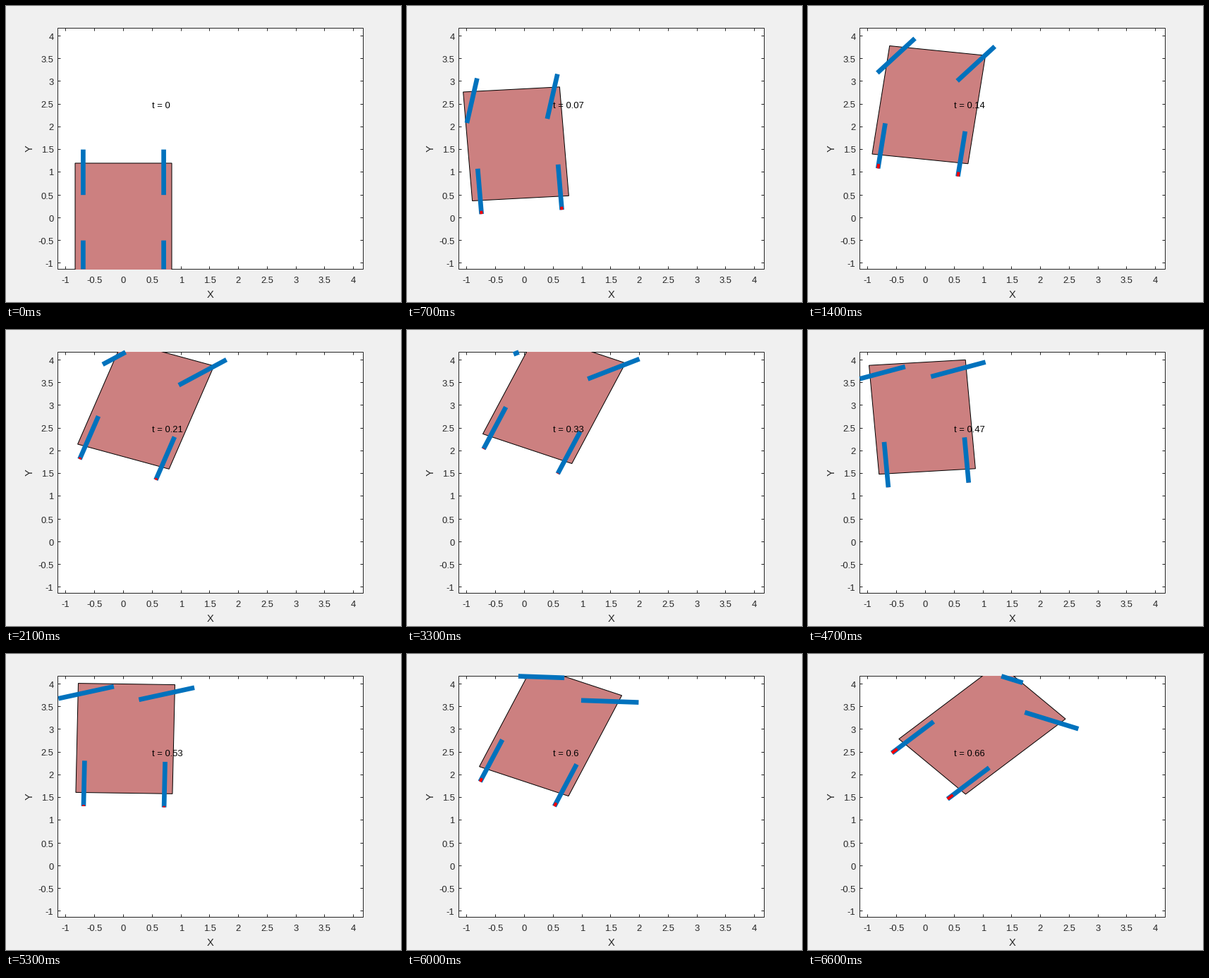
A matplotlib script for the animation above (6.7 s loop, 560 px wide and 420 px high).

```python
import numpy as np
import matplotlib.pyplot as plt
from matplotlib.animation import FuncAnimation
from matplotlib.collections import LineCollection
from matplotlib.patches import Polygon, Rectangle

FRAMES, STEP = 67, 100
SUB = 20                                 # integration steps per frame
PT = 0.72                                # points per pixel at 100 dpi
L, R, T, B = 73.5, 506.5, 31.5, 373.5    # plot box in pixels
INK, BLUE = "#262626", "#0072BD"

plt.rcParams["font.family"] = "Liberation Sans"


def drive():
    """Rear axle path, heading, speed and curvature of a bicycle-model car."""
    when = [0, 3, 7, 14, 21, 33, 36, 41, 44, 53, 66]
    pedal = [.2, .298, .143, .105, .062, -.032, -.055, -.0384, -.0227, .0243, .0668]
    wheel = [0, -.129, .125, .33, .375, .435, .585, .98, 2.05, 1.7, 1.07]
    t = np.arange(FRAMES * SUB) / SUB
    mid = t + 0.5 / SUB
    ds = np.interp(mid, when, pedal) / SUB
    turn = ds * np.interp(mid, when, wheel)
    angle = np.cumsum(turn) - turn
    dx, dy = ds * np.sin(angle + turn / 2), ds * np.cos(angle + turn / 2)
    x, y = np.cumsum(dx) - dx, np.cumsum(dy) - dy - 1
    n = np.arange(FRAMES)
    path = np.stack([x, y], -1)[::SUB]
    return path, angle[::SUB], np.interp(n, when, pedal), np.interp(n, when, wheel)


path, heading, speed, bend = drive()
steer = np.arctan(2 * bend)
slip = np.maximum(0, 27 * speed ** 2 * bend)


def to_px(p):
    p = np.asarray(p, float)
    return np.stack([166.5 + 81.55 * p[..., 0], 300.4 - 64.5 * p[..., 1]], -1)


def axis_of(a):
    return np.array([np.sin(a), np.cos(a)])


def clip(p, q):
    """Part of the segment p-q inside the plot box, or None."""
    d, lo, hi = q - p, 0.0, 1.0
    for i, (a, b) in enumerate([(L, R), (T, B)]):
        if abs(d[i]) < 1e-9:
            if not a <= p[i] <= b:
                return None
            continue
        u, v = sorted([(a - p[i]) / d[i], (b - p[i]) / d[i]])
        lo, hi = max(lo, u), min(hi, v)
    return [p + lo * d, p + hi * d] if lo < hi else None


def clipped(segments):
    parts = (clip(*to_px(s)) for s in segments)
    return [s for s in parts if s is not None]


fig = plt.figure(figsize=(5.6, 4.2), dpi=100, facecolor="#F0F0F0")
ax = fig.add_axes([0, 0, 1, 1])
ax.set_xlim(0, 560)
ax.set_ylim(420, 0)
ax.axis("off")


def label(x, y, s, size=13, **kw):
    kw = {"color": INK, "ha": "center", "va": "baseline", **kw}
    return ax.text(x, y, s, fontsize=size * PT, **kw)


def lines(segments, color, width, z):
    c = LineCollection(segments, colors=color, lw=width * PT,
                       capstyle="butt", zorder=z, snap=False)
    ax.add_collection(c, autolim=False)
    return c


# Plot box, ticks and labels
ax.add_patch(Rectangle((L, T), R - L, B - T, fc="white", ec=INK, lw=PT,
                       zorder=1, snap=False))
ticks = []
for v in np.arange(-1, 4.1, 0.5):
    x, y = np.floor(to_px((v, v))) + 0.5
    ticks += [[(x, B), (x, B - 4)], [(x, T), (x, T + 4)],
              [(L, y), (L + 4, y)], [(R, y), (R - 4, y)]]
    label(x, 393.4, f"{v:g}")
    label(67.5, y + 5, f"{v:g}", ha="right")
lines(ticks, INK, 1, 1)
label(290, 414, "X", 14.6)
label(37.7, 202.5, "Y", 14.6, rotation=90, rotation_mode="anchor")

# Moving parts
window = Rectangle((L - .5, T - .5), R - L + 1, B - T + 1, fc="none", ec="none")
ax.add_patch(window)
body = Polygon(np.zeros((4, 2)), fc="#CC8080", ec="black", lw=PT, zorder=2, snap=False)
ax.add_patch(body)
body.set_clip_path(window)
wheels = lines([], BLUE, 6.67, 3)
marks = lines([], "red", 4, 4)
clock = label(206.7, 145, "", color="black", ha="left", zorder=5)


def draw(n):
    rear, fwd = path[n], axis_of(heading[n])
    side = np.array([fwd[1], -fwd[0]])
    roll = axis_of(heading[n] + steer[n])

    mid = rear + fwd
    body.set_xy(to_px([mid + .84 * a * side + 1.2 * b * fwd
                       for a, b in [(-1, -1), (-1, 1), (1, 1), (1, -1)]]))
    tyres, tails = [], []
    for s in (-.7, .7):
        back, front = rear + s * side, rear + s * side + 2 * fwd
        tyres += [(back - fwd / 2, back + fwd / 2), (front - roll / 2, front + roll / 2)]
        tails.append((back - fwd / 2, back + (slip[n] - .5) * fwd))
    wheels.set_segments(clipped(tyres))
    marks.set_segments(clipped(tails))
    clock.set_text(f"t = {n / 100:g}")
    return body, wheels, marks, clock


anim = FuncAnimation(fig, draw, frames=FRAMES, interval=STEP, repeat=True,
                     repeat_delay=0, blit=False)
plt.show()
```
